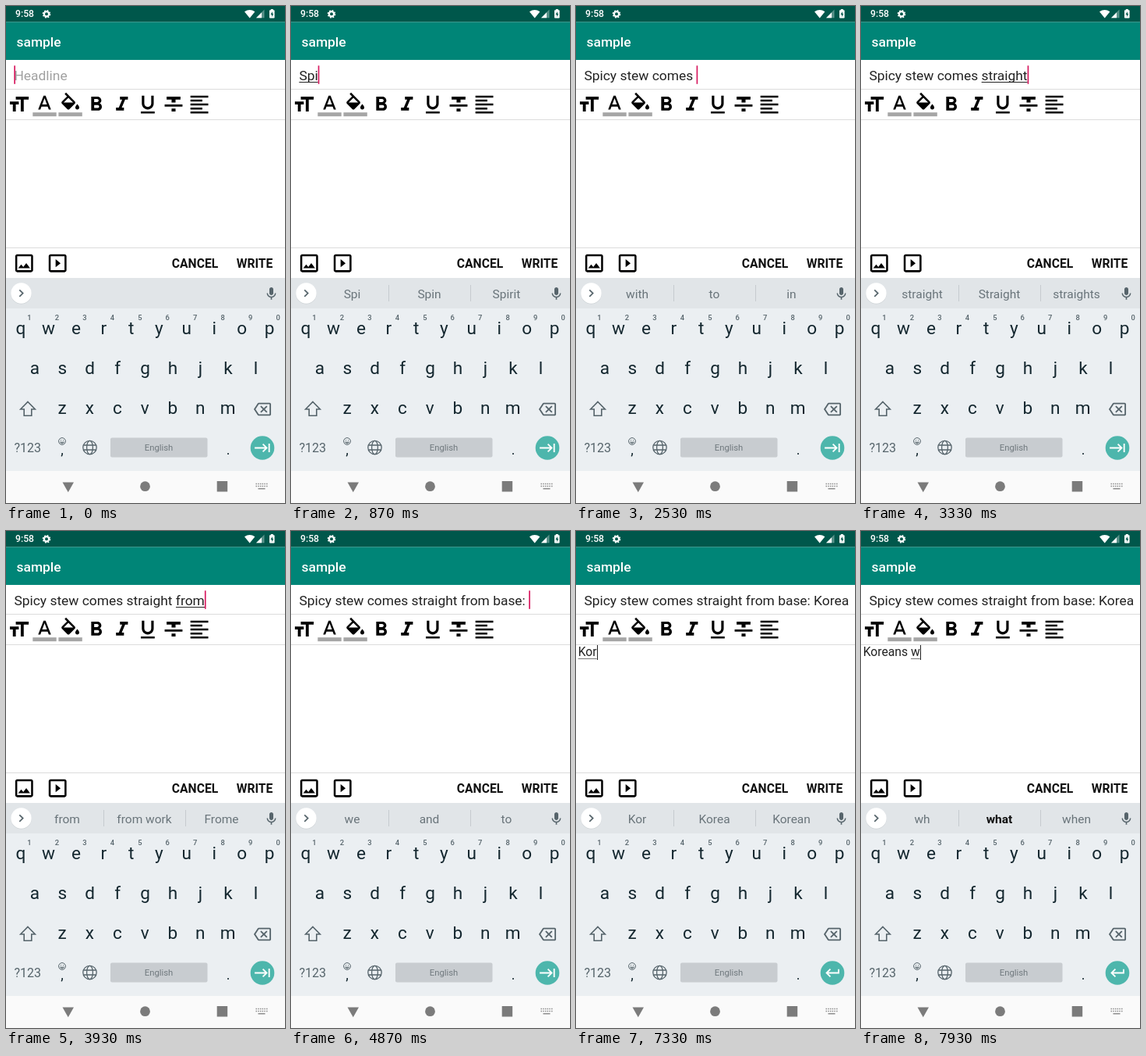
Write an HTML page that moves like this. It is 358 px wide and 636 px high and loops after 8000 ms.

```html
<!DOCTYPE html>
<html lang="en">
<head>
<meta charset="utf-8">
<title>Editor typing</title>
<style>
html, body { margin: 0; width: 100%; height: 100%; overflow: hidden; background: #fff; }
svg { display: block; width: 358px; height: 636px; }
text { font-family: Roboto, sans-serif; white-space: pre; }
.mid { text-anchor: middle; }
</style>
</head>
<body>
<svg id="stage" viewBox="0 0 358 636" xmlns="http://www.w3.org/2000/svg"></svg>
<script>
const LOOP = 8000, HEAD_SIZE = 17.42, BODY_SIZE = 15.68;
const HEADLINE = 'Spicy stew comes straight from base: Korea';
const BODY = 'Koreans w';

// [time, characters typed, suggestions]
const headSteps = [
  [0, 0, ''], [530, 1, 'S|So|She'], [730, 2, 'Sp|Sp|Spain'],
  [870, 3, 'Spi|Spin|Spirit'], [1000, 4, 'Spic|Spice|Spicy'], [1130, 5, 'Spicy|Spicey|Spice'],
  [1270, 6, 'and|food|chicken'], [1400, 7, 's|so|she'], [1470, 8, 'st|St|still'],
  [1600, 9, 'ste|Ste|step'], [1670, 10, 'stew|Stew|steward'], [1800, 11, 'and|with|is'],
  [1930, 12, 'c|can|could'], [2070, 13, 'co|could|come'], [2200, 14, 'com|come|comes'],
  [2270, 15, 'come|comes|comet'], [2400, 16, 'comes|Comes|comes to'], [2530, 17, 'with|to|in'],
  [2600, 18, 's|so|she'], [2730, 19, 'st|St|still'], [2870, 20, 'str|strong|street'],
  [2930, 21, 'stra|straight|strap'], [3070, 22, 'strait|straight|strain'],
  [3130, 23, 'straight|straighten|straights'], [3270, 24, 'straight|straighten|straights'],
  [3330, 25, 'straight|Straight|straights'], [3470, 26, 'to|up|from'], [3530, 27, 'f|for|from'],
  [3670, 28, 'fr|from|friend'], [3800, 29, 'fro|from|front'], [3930, 30, 'from|from work|Frome'],
  [4070, 31, 'the|a|my'], [4200, 32, 'b|by|be'], [4270, 33, 'ba|back|bad'],
  [4330, 34, 'bas|base|basic'], [4470, 35, 'base|Base|based'], [4730, 36, 'we|and|to'],
  [4870, 37, 'we|and|to'], [5070, 38, 'K|Kids|Key'], [5130, 39, 'Ko|Kong|Korea'],
  [5330, 40, 'Kor|Korea|Korean'], [5400, 41, 'Kore|Korea|Korean'], [5470, 42, 'Korea|Korean|Koreans'],
];
const bodySteps = [
  [6330, 0, ''], [7130, 1, 'K|Kids|Key'], [7270, 2, 'Ko|Kong|Korea'], [7330, 3, 'Kor|Korea|Korean'],
  [7400, 4, 'Kore|Korea|Korean'], [7530, 5, 'Korea|Korean|Koreans'], [7600, 6, 'Korean|Koreans|Korea'],
  [7670, 7, 'Koreans|Korean|Korea'], [7800, 8, 'are|have|and'], [7870, 9, 'w|who|will'],
  [7930, 9, 'wh|*what|when'],
];
const CAPS_ON = 6400, CAPS_OFF = 7200, FOCUS = 6330;

const rect = (x, y, w, h, fill, more = '') =>
  `<rect x="${x}" y="${y}" width="${w}" height="${h}" fill="${fill}" ${more}/>`;
const text = (x, y, size, fill, str, more = '') =>
  `<text x="${x}" y="${y}" font-size="${size}" fill="${fill}" ${more}>${str}</text>`;
const mid = (x, y, size, fill, str, more = '') => text(x, y, size, fill, str, 'class="mid" ' + more);
const icon = (cx, cy, scale, d, fill = '#000', more = '') =>
  `<path transform="translate(${cx} ${cy}) scale(${scale}) translate(-12 -12)" d="${d}" fill="${fill}" ${more}/>`;
const line = (d, color, width, more = '') =>
  `<path d="${d}" fill="none" stroke="${color}" stroke-width="${width}" ${more}/>`;

const FRAME = 'M19 3H5c-1.1 0-2 .9-2 2v14c0 1.1.9 2 2 2h14c1.1 0 2-.9 2-2V5c0-1.1-.9-2-2-2zm0 16H5V5h14v14z';
const tools = [
  'M9 4v3h5v12h3V7h5V4H9zm-6 8h3v7h3v-7h3V9H3v3z',
  'M11 3L5.5 17h2.25l1.12-3h6.25l1.12 3h2.25L13 3h-2zm-1.38 9L12 5.67 14.38 12H9.62z',
  'M16.56 8.94L7.62 0 6.21 1.41l2.38 2.38-5.15 5.15c-.59.59-.59 1.54 0 2.12l5.5 5.5c.29.29.68.44 1.06.44s.77-.15 1.06-.44l5.5-5.5c.59-.58.59-1.53 0-2.12zM5.21 10L10 5.21 14.79 10H5.21zM19 11.5s-2 2.17-2 3.5c0 1.1.9 2 2 2s2-.9 2-2c0-1.33-2-3.5-2-3.5z',
  'M15.6 10.79c.97-.67 1.65-1.77 1.65-2.79 0-2.26-1.75-4-4-4H7v14h7.04c2.09 0 3.71-1.7 3.71-3.79 0-1.52-.86-2.82-2.15-3.42zM10 6.5h3c.83 0 1.5.67 1.5 1.5s-.67 1.5-1.5 1.5h-3v-3zm3.5 9H10v-3h3.5c.83 0 1.5.67 1.5 1.5s-.67 1.5-1.5 1.5z',
  'M10 4v3h2.21l-3.42 8H6v3h8v-3h-2.21l3.42-8H18V4z',
  'M12 17c3.31 0 6-2.69 6-6V3h-2.5v8c0 1.93-1.57 3.5-3.5 3.5S8.5 12.93 8.5 11V3H6v8c0 3.31 2.69 6 6 6zm-7 2v2h14v-2H5z',
  'M10 19h4v-3h-4v3zM5 4v3h5v3h4V7h5V4H5zM3 14h18v-2H3v2z',
  'M15 15H3v2h12v-2zm0-8H3v2h12V7zM3 13h18v-2H3v2zm0 8h18v-2H3v2zM3 3v2h18V3H3z',
];
const BACKSPACE = 'M22 3H7c-.69 0-1.23.35-1.59.88L0 12l5.41 8.11c.36.53.9.89 1.59.89h15c1.1 0 2-.9 2-2V5c0-1.1-.9-2-2-2zm0 16H7.07L2.4 12l4.66-7H22v14zm-11.59-2L14 13.41 17.59 17 19 15.59 15.41 12 19 8.41 17.59 7 14 10.59 10.41 7 9 8.41 12.59 12 9 15.59z';
const MIC = 'M12 14c1.66 0 2.99-1.34 2.99-3L15 5c0-1.66-1.34-3-3-3S9 3.34 9 5v6c0 1.66 1.34 3 3 3zm5.3-3c0 3-2.54 5.1-5.3 5.1S6.7 14 6.7 11H5c0 3.41 2.72 6.23 6 6.72V21h2v-3.28c3.28-.48 6-3.3 6-6.72h-1.7z';
const TAB = 'M11.59 7.41L15.17 11H1v2h14.17l-3.59 3.59L13 18l6-6-6-6-1.41 1.41zM20 6v12h2V6h-2z';
const RETURN = 'M19 7v4H5.83l3.58-3.59L8 6l-6 6 6 6 1.41-1.41L5.83 13H21V7z';
const SHIFT = 'M28 506.5L37.3 516H32.8V524.3H23.2V516H18.7Z';
const GREY = '#56646b', INK = '#14272f';

function statusBar() {
  return rect(0, 0, 358, 20.5, '#00574b') + rect(0, 20.5, 358, 48.5, '#008577') +
    text(12, 14.3, 12.2, '#fff', '9:58', 'font-weight="500"') +
    '<g fill="none" stroke="#fff"><circle cx="52" cy="10.3" r="3.1" stroke-width="2.2"/>' +
    '<circle cx="52" cy="10.3" r="4.5" stroke-width="1.6" stroke-dasharray="1.9 1.634"/></g>' +
    '<path d="M306 7.3Q312.700 2.800 319.400 7.300L312.700 15.500Z" fill="#fff"/>' +
    '<path d="M331.500 4.500V15.300H321Z" fill="#fff" opacity=".35"/><path d="M328 8.200V15.300H321Z" fill="#fff"/>' +
    rect(338, 5.2, 6.6, 10.4, '#fff', 'rx=".8"') + rect(339.8, 4, 3, 2, '#fff') +
    '<path d="M341.900 7L339.500 11.100H341V14L343.300 9.800H341.900Z" fill="#00574b"/>' +
    text(13.5, 51.6, HEAD_SIZE, '#fff', 'sample', 'font-weight="500"');
}

function editor() {
  const bars = [1, 2].map(i => rect(1.2 + 33.1 * i, 136.2, 30.4, 5, '#a6a6a6')).join('');
  return rect(0, 106, 358, 1, '#dcdcdc') + rect(0, 145, 358, 1, '#dcdcdc') + rect(0, 309, 358, 1, '#dcdcdc') +
    bars + tools.map((d, i) => icon(16.4 + 33.1 * i, 126.1, 1.27, d)).join('') +
    icon(23.3, 329.2, 1.27, FRAME + 'M14.14 11.86l-3 3.87L9 13.14 6 17h12l-3.86-5.14z') +
    icon(66.2, 329.2, 1.27, FRAME + 'M10 8v8l5-4-5-4z') +
    text(212.8, 335, 15.68, '#111', 'CANCEL', 'font-weight="700"') +
    text(295.700, 335, 15.68, '#111', 'WRITE', 'font-weight="700"');
}

function letters(upper) {
  const rows = [['qwertyuiop', 19, 419.5], ['asdfghjkl', 36.8, 470.5], ['zxcvbnm', 72, 522]];
  return rows.map(([keys, x, y]) => [...keys].map((k, i) =>
    mid(x + 35.45 * i, y + (upper ? 2 : 0), 22.6, INK, upper ? k.toUpperCase() : k)).join('')).join('');
}

function keyboard() {
  const digits = [...'1234567890'].map((d, i) =>
    mid(30 + 35.45 * i, 402.3, 9.4, GREY, d, 'font-weight="500"')).join('');
  return rect(0, 348, 358, 39, '#e1e5e8') + rect(0, 387, 358, 208, '#ebeff2') +
    '<circle cx="19.500" cy="368.200" r="13.300" fill="#cfd4d7"/><circle cx="19.500" cy="367.500" r="13.200" fill="#fff"/>' +
    line('M17.300 363.300L21.700 367.600L17.300 371.900', GREY, 1.7) +
    icon(340.5, 368.3, .84, MIC, GREY) + digits +
    `<g id="lower">${letters(false)}${line(SHIFT, GREY, 1.6)}${icon(0, 0, 1, '')}</g>` +
    `<g id="upper">${letters(true)}<path d="${SHIFT}" fill="${GREY}" stroke="${GREY}"/></g>` +
    icon(329, 516, .92, BACKSPACE, GREY) +
    text(10.5, 570.6, 16, GREY, '?123') +
    '<g fill="none" stroke="' + GREY + '"><circle cx="72" cy="557" r="4.400"/>' +
    '<path d="M69.500 558.200Q72 561.400 74.500 558.200Z M70 555.700h1 M73 555.700h1"/>' +
    '<g stroke-width="1.300"><circle cx="107.500" cy="565" r="8.700"/><ellipse cx="107.500" cy="565" rx="3.900" ry="8.700"/>' +
    '<path d="M99.500 562h16M99.500 568h16"/></g></g>' +
    mid(72, 573.5, 18, INK, ',') + mid(285, 573.5, 18, INK, '.') +
    rect(134, 552.5, 124.500, 25, '#c8ccd0', 'rx="2"') + mid(196, 569, 11.3, '#70797e', 'English') +
    '<circle cx="329" cy="565.500" r="15.300" fill="#4db6ac"/>' +
    icon(329.3, 565.5, .93, TAB, '#fff', 'id="tab"') + icon(329.5, 565.5, .93, RETURN, '#fff', 'id="enter"');
}

function navBar() {
  const dots = [611.5, 614.5].map(y => `M320.500 ${y}h15`).join('');
  return rect(0, 595, 358, 41, '#fafafa') +
    '<g fill="#7b7b7b"><path d="M72.500 609.500H87L79.750 622.300Z"/><circle cx="178.500" cy="614.700" r="6.400"/></g>' +
    rect(270.700, 608, 13.500, 13.500, '#7b7b7b') +
    line(dots, '#8c8c8c', 1.5, 'stroke-dasharray="1.500 1.200"') + line('M323.500 617.700h9', '#8c8c8c', 1.5);
}

const stage = document.getElementById('stage');
stage.innerHTML = rect(0, 0, 358, 636, '#fff') + statusBar() + editor() +
  text(10.4, 95, HEAD_SIZE, '#222', '', 'id="head"') + rect(0, 97, 0, 1, '#222', 'id="headLine"') +
  rect(0, 76.3, 1.7, 23.5, '#d81b60', 'id="headCaret"') +
  text(2.7, 160.3, BODY_SIZE, '#222', '', 'id="body"') + rect(0, 163, 0, 1, '#777', 'id="bodyLine"') +
  rect(0, 146, 1, 19, '#222', 'id="bodyCaret"') + keyboard() +
  '<g id="strip">' + rect(125, 357, 1, 21, '#c6cbcf') + rect(230, 357, 1, 21, '#c6cbcf') +
  [78.5, 177.5, 276.5].map((x, i) => mid(x, 373.7, 15.5, '#69747a', '', `id="sug${i}"`)).join('') + '</g>' + navBar();

const $ = id => document.getElementById(id);
const pen = document.createElement('canvas').getContext('2d');
const show = (id, on) => $(id).setAttribute('visibility', on ? 'visible' : 'hidden');
const set = (id, attrs) => { for (const k in attrs) $(id).setAttribute(k, attrs[k]); };

function measure(str, size) {
  pen.font = `${size * 10}px Roboto, sans-serif`;
  return pen.measureText(str).width / 10;
}

const stepAt = (steps, t) => steps.filter(s => s[0] <= t).pop();

// Places the text, the line under the word being typed, and the caret.
function field(id, str, x, size, start, focused, caretOn) {
  $(id).textContent = str;
  const word = str.slice(str.lastIndexOf(' ') + 1);
  const composing = focused && word && !word.endsWith(':');
  const from = measure(str.slice(0, str.length - word.length), size);
  const width = measure(str, size);
  set(id + 'Line', { x: x + from, width: composing ? width - from : 0 });
  set(id + 'Caret', { x: id === 'body' ? Math.round(start + width) : start + width });
  show(id + 'Caret', focused && caretOn);
}

function suggest(list) {
  show('strip', list);
  list.split('|').forEach((s, i) => {
    const strong = s[0] === '*';
    $('sug' + i).textContent = strong ? s.slice(1) : s;
    set('sug' + i, { fill: strong ? '#111' : '#69747a', 'font-weight': strong ? 700 : 400 });
  });
}

function draw(t) {
  const inBody = t >= FOCUS;
  const head = stepAt(headSteps, t);
  const body = stepAt(bodySteps, t) || [0, 0, ''];
  const now = inBody ? body : head;
  // The caret blinks every half second, starting again at each key.
  const since = t - now[0] + (now[0] ? 30 : 370);
  const caretOn = since % 1000 < 500;

  field('head', HEADLINE.slice(0, head[1]), 10.4, HEAD_SIZE, 10.3, !inBody, caretOn);
  field('body', BODY.slice(0, body[1]), 2.7, BODY_SIZE, 2.7, inBody, caretOn);
  if (!head[1]) $('head').textContent = 'Headline';
  set('head', { fill: head[1] ? '#222' : '#a0a0a0' });
  suggest(now[2]);

  const caps = t >= CAPS_ON && t < CAPS_OFF;
  show('lower', !caps);
  show('upper', caps);
  show('tab', t < CAPS_ON);
  show('enter', t >= CAPS_ON);
}

const began = performance.now();
function tick() {
  draw((performance.now() - began) % LOOP);
  requestAnimationFrame(tick);
}
tick();
</script>
</body>
</html>
```
